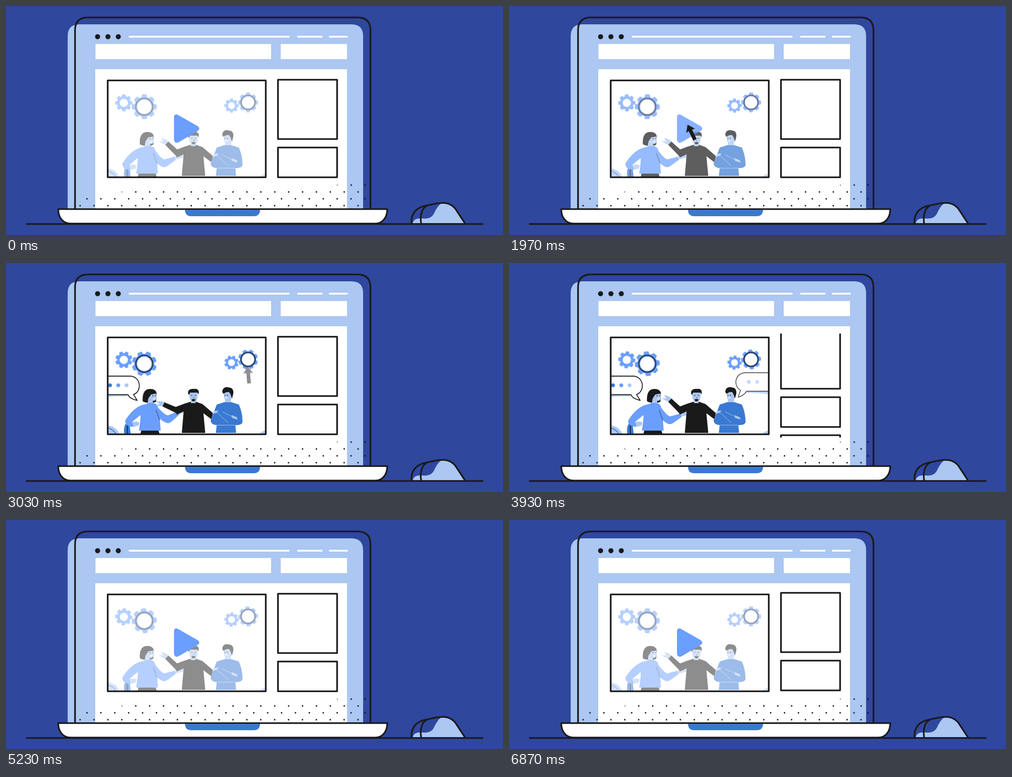
Recreate the animation shown at these times as an HTML page. Size 1080 px wide and 500 px high, loop 6930 ms.

```html
<!DOCTYPE html>
<html lang="en">
<head>
<meta charset="utf-8">
<title>Video lesson on a laptop</title>
<style>
  html, body { margin: 0; width: 100%; height: 100%; overflow: hidden; background: #2f479d; }
  svg { display: block; width: 100%; height: 100%; }
  .line { fill: none; stroke: #1a1a1a; stroke-width: 3.6; stroke-linecap: round; stroke-linejoin: round; }
  .thin { stroke-width: 1.8; }
  .white { fill: #fff; }
  .ink { fill: #1a1a1a; }
  .pale { fill: #abc7f2; }
  .sky { fill: #6a9eff; }
  .blue { fill: #3a79d2; }
  .fold { fill: none; stroke: #abc7f2; stroke-width: 1; }
  #reach { transform-origin: 322px 318px; }
  #forearm { transform-origin: 372px 325px; }
</style>
</head>
<body>
<svg viewBox="0 0 1080 500" preserveAspectRatio="none">
  <defs>
    <clipPath id="videoClip"><rect x="222" y="163" width="341.5" height="209.5"/></clipPath>
    <clipPath id="listClip"><rect x="580" y="154" width="150" height="227"/></clipPath>
  </defs>

  <!-- laptop screen -->
  <path class="pale" d="M134 443V66Q134 40 160 40H750Q776 40 776 66V443Z"/>
  <g class="ink">
    <circle cx="199" cy="67" r="5.5"/><circle cx="221.500" cy="67" r="5.5"/><circle cx="244" cy="67" r="5.5"/>
  </g>
  <path d="M268.500 67H614.500M634.500 67H686M703.500 67H741" stroke="#fff" stroke-width="4" stroke-linecap="round"/>
  <path class="white" d="M194.500 83H576V116H194.500ZM597 83H741V116H597ZM194 138H741V443H194Z"/>
  <g id="halftone" class="ink"></g>
  <path class="line" d="M150 443V53Q150 25 178 25H764Q792 25 792 53V443"/>

  <!-- base, ground and mouse -->
  <path class="line" d="M45 476H1036"/>
  <path class="line" style="fill:#fff" d="M113.500 443.500H828.500C828.500 462 818 475 803 475H140C124 475 113.500 462 113.500 443.500Z"/>
  <path class="blue" d="M389 445H552Q552 459 538 459H403Q389 459 389 445Z"/>
  <path class="pale" d="M884 474C886 465 894 463 905 464C921 465 927 460 931 451C936 441 941 433 948 430C960 428 969 432 977 443L997 474Z"/>
  <path class="line" d="M881 474C880 454 891 440 912 436L936 431C956 428 966 431 976 442L997 474M902 474C899 455 905 440 915 436"/>

  <!-- side list -->
  <g clip-path="url(#listClip)">
    <g id="list" class="line">
      <rect x="591" y="161" width="128.500" height="129.500"/>
      <rect x="591" y="309" width="128.500" height="65"/>
      <rect x="591" y="392" width="128.500" height="65"/>
    </g>
  </g>

  <!-- video -->
  <g clip-path="url(#videoClip)">
    <g id="scene">
      <g id="gears"></g>

      <path class="pale" d="M222 355C234 356 243 364 246 373H222Z"/>
      <path class="line thin" style="stroke:#3a79d2" d="M222 360Q233 364 239 373"/>
      <path class="blue" d="M257 374C255 359 258 348 268 347L271 374Z"/>
      <path class="line thin" d="M264 373Q262 359 266 350"/>
      <path class="pale" d="M550 373Q556 367 565 366V373Z"/>

      <g id="leftBubble">
        <path class="pale" d="M222 288H264L262 291Q240 290 222 292Z"/>
        <path class="line thin" style="fill:#fff" d="M215 247H269C294 247 296 281 277 287L285 300C276 298 268 295 265 287.500H215Z"/>
        <g id="leftDots">
          <circle class="blue" cx="226" cy="267" r="4.300"/><circle class="sky" cx="244" cy="267" r="4.300"/><circle class="pale" cx="262" cy="267" r="4.300"/>
        </g>
      </g>
      <g id="rightBubble">
        <path class="pale" d="M515 281H565V287Q545 283 515 284Z"/>
        <path class="line thin" style="fill:#fff" d="M570 239.500H514C490 240 487 269 503 278L498 293C506 291 512 287 516 280H570Z"/>
        <g id="rightDots">
          <circle class="pale" cx="521" cy="259.500" r="4.300"/><circle class="sky" cx="539" cy="259.500" r="4.300"/><circle class="blue" cx="557.500" cy="259.500" r="4.300"/>
        </g>
      </g>

      <!-- woman -->
      <g id="woman">
        <path class="ink" d="M288 365H325L328 374H286Z"/>
        <g id="head">
          <path class="ink" d="M291 302C290 288 293 275 307 275C318 275 322 281 321 288L320 303C311 307 297 306 291 302Z"/>
          <path class="pale" d="M303 296L309 287L320 285C322 293 321 300 316 301L313 301V309H301Z"/>
          <path class="ink" d="M312 289h2v2h-2zM317.500 288.500h1.500v2h-1.500z"/>
          <path d="M313 296Q316 298 318 295" fill="none" stroke="#fff" stroke-width="1.600"/>
        </g>
        <path class="pale" d="M264 351C267 346 278 345 284 348L282 355L270 358Z"/>
        <g id="reach">
          <path class="pale" d="M364 331C371 324 379 322 387 321L383 325L391 327C384 333 375 333 366 336Z"/>
          <path class="sky" d="M316 308C325 313 333 331 344 335L366 329L369 336C355 346 349 352 343 352C335 351 326 341 321 335Z"/>
        </g>
        <path class="sky" d="M298 308C308 304 319 305 323 311C328 324 329 347 330 366H283C285 350 287 338 286 332L268 347L271 357C262 359 252 353 253 344C262 330 275 312 298 308Z"/>
        <path class="line" style="stroke-width:.8" d="M320 321L328 343"/>
      </g>

      <!-- man in the middle -->
      <g id="forearm">
        <path class="pale" d="M332 295L342 296L337 289Q348 289 355 298L348 303Q338 300 332 295Z"/>
        <path class="ink" d="M353 296L375 316L372 330L346 303Z"/>
      </g>
      <path class="ink" d="M388 307L401 303H413L427 308L450 328L446 341L429 328L433 371H382L386 324L371 331L367 315Z"/>
      <path class="pale" d="M399 283H416C417 293 416 300 412 302V306H402V301C398 297 398 290 399 283Z"/>
      <path class="ink" d="M396 286C394 277 401 274 409 275C417 273 421 280 418 287L416 283H400L398 288ZM403 298Q408 296 412 298Q411 302 407 302Q404 302 403 298Z"/>
      <path class="line" style="stroke-width:1" d="M402 289H405M410 289H413M407 294H409"/>

      <!-- man on the right -->
      <path class="pale" d="M474 280H489L492 292Q488 295 489 305H475L476 299Q472 294 474 280ZM458 352H499L500 371H456Z"/>
      <path class="ink" d="M470 282C470 272 478 269 485 272C493 272 496 280 493 289L491 296L488 287L485 282C480 281 475 283 473 286Z"/>
      <path d="M476 294Q479 296 481 293" fill="none" stroke="#fff" stroke-width="1.600"/>
      <path class="ink" d="M475 288h1.500v2h-1.500zM480 288h2v2h-2z"/>
      <path class="blue" d="M474 304H490L506 309C512 322 514 336 514 347C513 353 506 354 498 354L500 371H456L458 354C449 353 444 349 445 343L458 309Z"/>
      <path class="pale" d="M448 330L452 323L462 322L458 327ZM490 332L502 337L503 342L491 338Z"/>
      <path class="fold" d="M457 325L483 349M470 325L494 337M458 354H498"/>
    </g>

    <path id="play" class="sky" d="M365 244Q365 234 374 238L416 262Q424 268 416 273L376 297Q366 302 365 291Z"/>
    <path id="cursor" class="ink" d="M0 0L10.500 15L4 14V37H-4V14L-10.500 15Z"/>
  </g>
  <rect class="line" x="221" y="162.500" width="343.500" height="211.500"/>
</svg>

<script>
const LOOP = 6930;
const $ = id => document.getElementById(id);

function make(tag, parent, attributes) {
  const node = document.createElementNS('http://www.w3.org/2000/svg', tag);
  for (const name in attributes) node.setAttribute(name, attributes[name]);
  return parent.appendChild(node);
}

// Each step is [time in ms, value]; the end values are held.
function move(node, property, steps, easing = 'linear') {
  const held = [[0, steps[0][1]], ...steps, [LOOP, steps[steps.length - 1][1]]];
  node.animate(
    held.map(([time, value]) => ({ offset: time / LOOP, [property]: value, easing })),
    { duration: LOOP, iterations: Infinity });
}

const shiftX = x => `translateX(${x}px)`;
const turn = angle => `rotate(${angle}deg)`;

// Halftone rows: first x, last x, y
for (const [from, to, y] of [[720, 781, 391], [251.800, 766, 406], [176, 781, 421], [161, 766, 436]]) {
  for (let x = from; x <= to; x += 30.200) {
    const r = x === from && y < 410 ? 0.900 : 1.700;
    make('circle', $('halftone'), { cx: x, cy: y, r });
  }
}

function gear(x, y, outer, body, hole, ring, direction) {
  const place = make('g', $('gears'), { transform: `translate(${x} ${y})` });
  const wheel = make('g', place, {});
  make('circle', wheel, { r: (body + hole) / 2, fill: 'none', stroke: '#6a9eff', 'stroke-width': body - hole });
  const half = outer * 0.200;
  for (let i = 0; i < 8; i++) {
    make('path', wheel, {
      class: 'sky', transform: `rotate(${i * 45})`,
      d: `M${-half * 1.250} ${-body + 1}L${-half * 0.850} ${-outer}H${half * 0.850}L${half * 1.250} ${-body + 1}Z`
    });
  }
  if (ring) make('circle', place, { r: ring, class: 'line', style: 'stroke-width:2' });
  move(wheel, 'transform', [[1930, turn(0)], [4670, turn(55 * direction)], [5300, turn(90 * direction)]]);
}
gear(256, 211.500, 18.500, 14.500, 9, 0, -1);
gear(300.500, 220, 27, 21.500, 15.500, 18.500, 1);
gear(490, 217.500, 15.500, 12, 7.500, 0, -1);
gear(526, 210.500, 21.500, 17.500, 13, 15.500, 1);

// Fades
move($('scene'), 'opacity', [[1870, .5], [2120, 1], [4700, 1], [5060, .5]]);
move($('play'), 'opacity', [[1900, 1], [2250, 0], [4640, 0], [5000, 1]]);
move($('leftBubble'), 'opacity', [[2400, 0], [2650, 1], [4720, 1], [5000, 0]]);
move($('rightBubble'), 'opacity', [[3700, 0], [4020, 1], [4720, 1], [5000, 0]]);

function dots(id, start, end) {
  [...$(id).children].forEach((dot, i) => {
    const from = start + i * 70;
    const to = end + i * 70;
    move(dot, 'opacity', [[from, 0], [from + 150, 1], [to, 1], [to + 150, 0]]);
  });
}
dots('leftDots', 2600, 4300);
dots('rightDots', 3790, 4720);

// Gestures
const soft = 'ease-in-out';
move($('woman'), 'transform', [[2400, shiftX(0)], [2850, shiftX(6)], [4150, shiftX(6)], [4600, shiftX(0)]], soft);
move($('head'), 'transform', [[2950, shiftX(0)], [3500, shiftX(3)], [4150, shiftX(3)], [4550, shiftX(0)]], soft);
move($('reach'), 'transform', [[2400, turn(0)], [3000, turn(-6)], [3600, turn(0)]], soft);
move($('forearm'), 'transform', [[2400, turn(0)], [3000, turn(-20)], [3650, turn(0)]], soft);

// Cursor
const point = (x, y, angle) => `translate(${x}px, ${y}px) rotate(${angle}deg)`;
move($('cursor'), 'transform', [
  [950, point(440, 330, -26)], [1600, point(388, 259, -26)],
  [2150, point(388, 259, -26)], [2850, point(525, 226, -5)]
], soft);
move($('cursor'), 'opacity', [[950, 0], [1150, 1], [2930, 1], [3130, 0]]);

// List scroll, up and back twice
const scroll = y => `translateY(${y}px)`;
move($('list'), 'transform', [
  [3740, scroll(0)], [4255, scroll(-53)], [4770, scroll(0)],
  [5970, scroll(0)], [6485, scroll(-53)], [6925, scroll(0)]
], 'cubic-bezier(.364,0,.636,1)');
</script>
</body>
</html>
```
